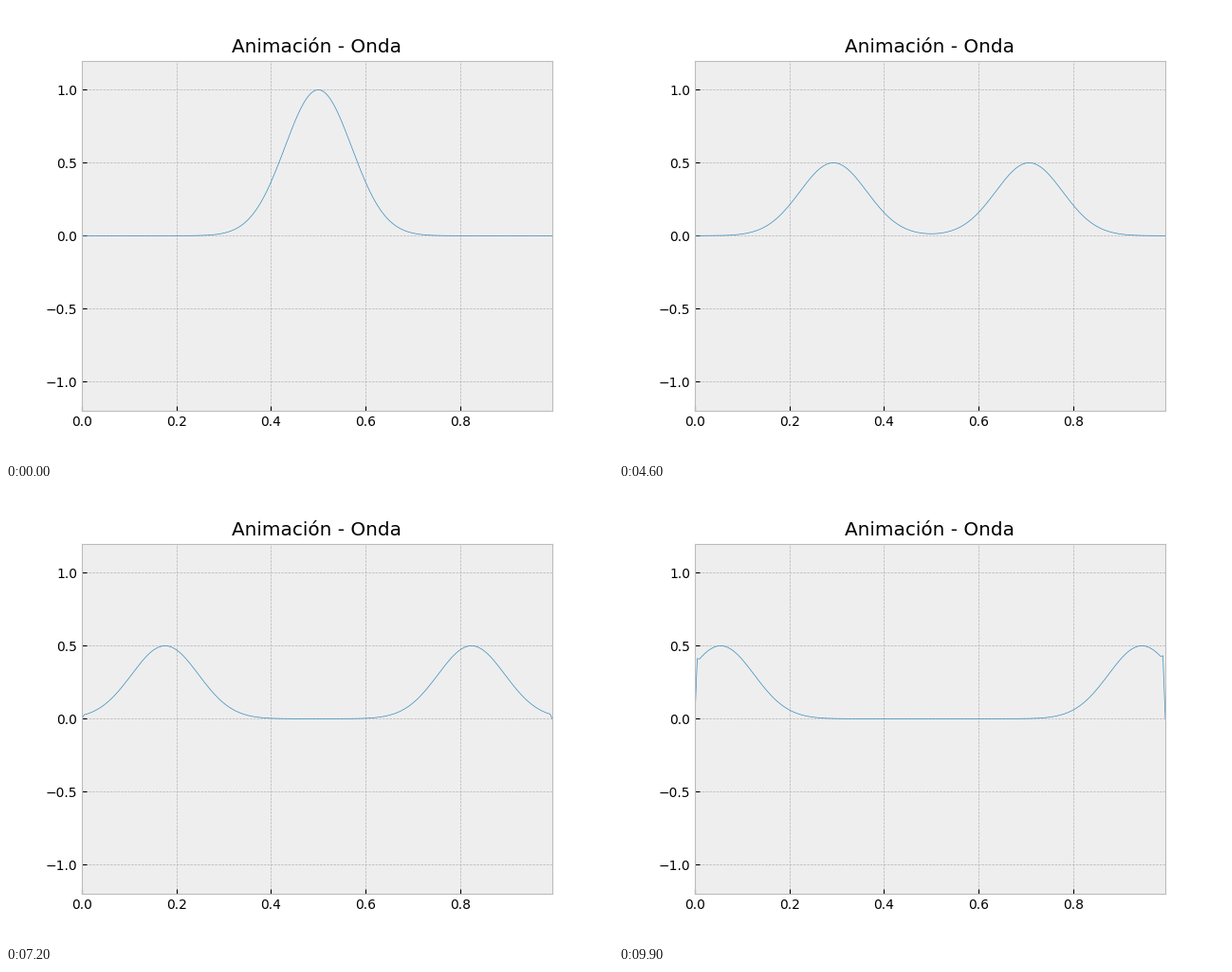
Write a matplotlib script that moves like this. It is 640 px wide and 480 px high and loops after 10 s.

```python
import numpy as np
import matplotlib.pyplot as plt
from matplotlib.animation import FuncAnimation

FRAMES = 100
INTERVAL = 100
DX = 0.005
COURANT = 0.9

plt.style.use("bmh")

x = np.arange(200) * DX
edge_gain = 1 + (1 - COURANT) / (1 + COURANT)


def pulse(center):
    return np.exp(-100 * (x - center) ** 2)


def wave(step):
    """Pulse splitting into two halves that leave through the open ends."""
    shift = COURANT * DX * step
    u = 0.5 * (pulse(0.5 - shift) + pulse(0.5 + shift))
    u[[1, -2]] *= edge_gain
    u[[0, -1]] = 0
    return u


fig, ax = plt.subplots(figsize=(6.4, 4.8), dpi=100)
ax.set_title("Animación - Onda")
ax.set_xlim(x[0], x[-1])
ax.set_ylim(-1.2, 1.2)
line, = ax.plot(x, wave(0), linewidth=0.5)


def update(step):
    line.set_ydata(wave(step))
    return line,


anim = FuncAnimation(fig, update, frames=FRAMES, interval=INTERVAL,
                     repeat=True, repeat_delay=0, blit=False)

plt.show()
```
